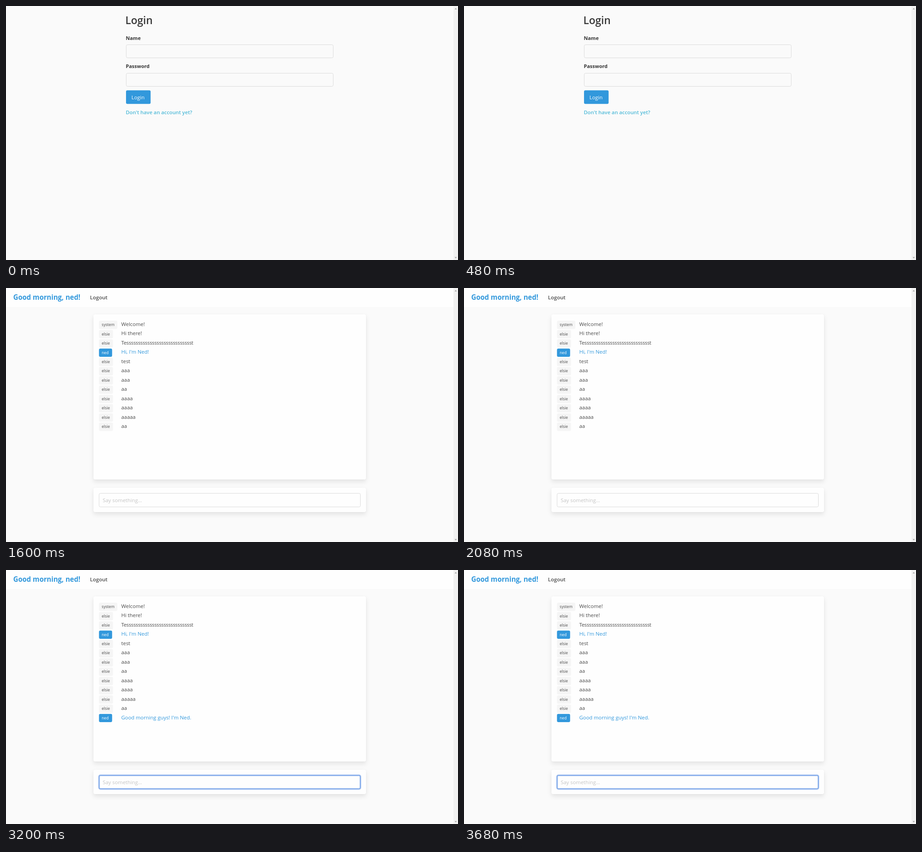
Write an HTML page that moves like this. It is 998 by 561 pixels and loops after 4000 ms.

```html
<!DOCTYPE html>
<html lang="en">
<head>
<meta charset="utf-8">
<title>Chat login</title>
<style>
  html, body { margin: 0; width: 100%; height: 100%; overflow: hidden; background: #fafafa; }
  svg { display: block; }
  text { font: 11.4px "Open Sans", "Noto Sans", sans-serif; fill: #4a4a4a; }
  text.title { font-size: 23px; font-weight: 600; fill: #363636; }
  text.label { font-size: 11px; font-weight: 700; fill: #363636; }
  text.brand { font-size: 15.1px; font-weight: 700; fill: #3298dc; }
  text.nav { font-size: 11.5px; font-weight: 600; }
  text.link { font-size: 11.3px; font-weight: 600; fill: #4fbad8; }
  text.error { font-size: 11px; font-weight: 700; font-style: italic; fill: #f14668; }
  text.hint { fill: #c4c4c4; }
  text.dots { font-size: 12.9px; fill: #363636; }
  text.tag { font-size: 8.6px; }
  text.mine { fill: #3298dc; }
  text.white { fill: #fff; }
  .field { fill: none; stroke: #dbdbdb; }
  .focus rect { fill: none; stroke: #3273dc; stroke-opacity: .3; stroke-width: 4; }
  .focus rect + rect { stroke: #4f88e2; stroke-opacity: 1; stroke-width: 1; }
  .card { fill: #fefefe; filter: drop-shadow(0 5px 5px rgba(10, 10, 10, .09)) drop-shadow(0 0 1px rgba(10, 10, 10, .05)); }

  .login, .chat, .slot, .typing, .shift { animation: 4s step-end infinite; }
  .login { animation-name: login; }
  .chat { animation-name: chat; }
  .typing { animation-name: typing; }
  .shift { animation-name: shift; }
  .slot { animation-name: slot; animation-delay: calc(var(--i) * 800ms - 4s); }
  @keyframes login { 0% { opacity: 1 } 40%, 100% { opacity: 0 } }
  @keyframes chat { 0% { opacity: 0 } 40%, 100% { opacity: 1 } }
  @keyframes typing { 0% { opacity: 0 } 60%, 100% { opacity: 1 } }
  @keyframes slot { 0% { opacity: 1 } 20%, 100% { opacity: 0 } }
  @keyframes shift { 0% { transform: none } 20%, 100% { transform: translateY(32.5px) } }
</style>
</head>
<body>
<svg width="998" height="561">
  <rect width="998" height="561" fill="#fafafa"/>

  <g class="login">
    <text class="title" x="263.5" y="40">Login</text>
    <text class="label" x="264.5" y="75">Name</text>
    <rect class="field" x="265.5" y="85.5" width="457" height="29" rx="3"/>
    <text class="label" x="264.5" y="137">Password</text>
    <rect class="field" x="265.5" y="148.5" width="457" height="29" rx="3"/>
    <g class="shift">
      <rect x="265" y="186.3" width="54.3" height="30" rx="3" fill="#3298dc"/>
      <text class="white" x="277" y="206">Login</text>
      <text class="link" x="264.5" y="239">Don't have an account yet?</text>
    </g>
    <g class="slot" style="--i:1">
      <text x="273.5" y="105">ned</text>
      <g class="focus">
        <rect x="265.5" y="148.5" width="457" height="29" rx="3"/>
        <rect x="265.5" y="148.5" width="457" height="29" rx="3"/>
      </g>
      <text class="dots" x="273.5" y="167.8">•••••••</text>
      <rect x="307.5" y="155" width="1" height="16" fill="#363636"/>
      <text class="error" x="265" y="203">- Invalid Credentials</text>
    </g>
  </g>

  <g class="chat">
    <rect width="988" height="42" fill="#fefefe"/>
    <text class="brand" x="16" y="25.5">Good morning, ned!</text>
    <text class="nav" x="185.5" y="25">Logout</text>
    <rect class="card" x="193" y="58" width="602" height="365" rx="4"/>
    <rect class="card" x="193" y="441" width="602" height="54" rx="4"/>
    <g id="log"></g>
    <rect class="field" x="205.5" y="453.5" width="577" height="30" rx="3"/>
    <g class="typing focus">
      <rect x="205.5" y="453.5" width="577" height="30" rx="3"/>
      <rect x="205.5" y="453.5" width="577" height="30" rx="3"/>
    </g>
    <text class="hint slot" style="--i:2" x="213.5" y="472.5">Say something...</text>
    <text class="slot" style="--i:3" x="213.5" y="472.5">Good morning guys! I'm Ned.</text>
    <text class="hint slot" style="--i:4" x="213.5" y="472.5">Say something...</text>
  </g>

  <rect x="988" width="10" height="561" fill="#f1f1f1"/>
  <path d="M990.5 7.5l2.5-3 2.5 3zM990.5 554.5l2.5 3 2.5-3z" fill="#a3a3a3"/>
</svg>
<script>
  const log = document.getElementById("log");
  const tagWidth = { system: 40.5, elsie: 31, ned: 29 };
  const messages = [
    ["system", "Welcome!"],
    ["elsie", "Hi there!"],
    ["elsie", "Te" + "s".repeat(28) + "t", -0.3],
    ["ned", "Hi, I'm Ned!"],
    ["elsie", "test"],
    ...[3, 3, 2, 4, 4, 5, 2].map(n => ["elsie", "a".repeat(n)]),
    ["ned", "Good morning guys! I'm Ned."]
  ];

  log.innerHTML = messages.map(([user, text, spacing = 0], i) => {
    const mine = user === "ned";
    const latest = i === messages.length - 1;
    return `<g transform="translate(0 ${i * 20.46})">
      <g ${latest ? 'class="slot" style="--i:4"' : ""}>
        <rect x="205.3" y="72.3" width="${tagWidth[user]}" height="18.3" rx="3" fill="${mine ? "#3298dc" : "#f5f5f5"}"/>
        <text class="tag ${mine ? "white" : ""}" x="211.3" y="84.2">${user}</text>
        <text class="${mine ? "mine" : ""}" x="254.5" y="84" letter-spacing="${spacing}">${text}</text>
      </g>
    </g>`;
  }).join("");
</script>
</body>
</html>
```
